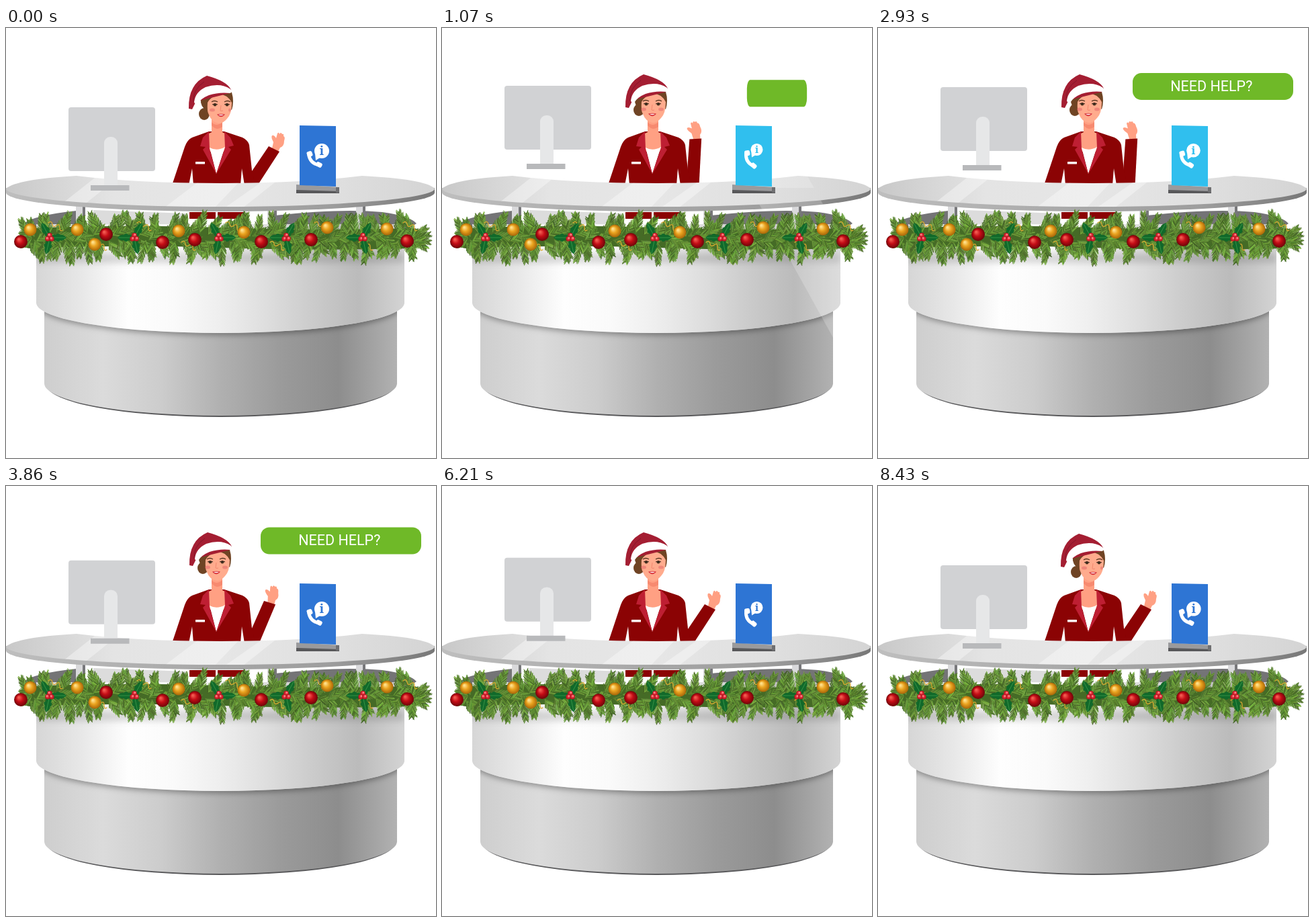
Animation, 640 px wide and 640 px high, one loop 8500 ms. Source, as an HTML page with a canvas:

```html
<!DOCTYPE html>
<html>
<head>
<meta charset="utf-8">
<style>
html, body { margin: 0; width: 100%; height: 100%; overflow: hidden; background: #fff; }
canvas { display: block; }
</style>
</head>
<body>
<canvas id="stage" width="640" height="640"></canvas>
<script>
const LOOP = 8500;
const stage = document.getElementById('stage').getContext('2d');
let c = stage;

const clamp = v => Math.max(0, Math.min(1, v));
const ramp = (t, a, b) => clamp((t - a) / (b - a));
const smooth = (t, a, b) => { const u = ramp(t, a, b); return u * u * (3 - 2 * u); };
const outCubic = u => 1 - (1 - u) ** 3;

function fill(path, color) {
  c.fillStyle = color;
  c.fill(path instanceof Path2D ? path : new Path2D(path));
}
function line(path, color, width) {
  c.strokeStyle = color;
  c.lineWidth = width;
  c.stroke(new Path2D(path));
}
function oval(x, y, rx, ry, color) {
  c.fillStyle = color;
  c.beginPath();
  c.ellipse(x, y, rx, ry, 0, 0, 7);
  c.fill();
}
function box(x, y, w, h, r, color) {
  c.fillStyle = color;
  c.beginPath();
  c.roundRect(x, y, w, h, r);
  c.fill();
}
function at(x, y, angle, draw, sx = 1, sy = sx) {
  c.save();
  c.translate(x, y);
  c.rotate(angle * Math.PI / 180);
  c.scale(sx, sy);
  draw();
  c.restore();
}
// Horizontal gradient of evenly spaced greys
function greys(x0, x1, ...values) {
  const g = c.createLinearGradient(x0, 0, x1, 0);
  values.forEach((v, i) => g.addColorStop(i / (values.length - 1), `rgb(${v},${v},${v})`));
  return g;
}

// Desk
const lower = new Path2D('M57 415V529A262.5 48 0 0 0 582 529V415Z');
const upper = new Path2D('M45 292V409A274 45 0 0 0 593 409V292Z');
const rim = new Path2D('M0 238V245A319 28 0 0 0 638 245V238Z');
const slab = new Path2D('M0 239Q16 225 105 220Q195 231 320 231Q440 231 530 220Q625 225 638 239A319 27 0 0 1 0 239Z');

function drawDesk() {
  fill('M60 531A259.5 48 0 0 0 579 531Z', '#58585a');
  fill(lower, greys(57, 582, 206, 219, 204, 176, 155, 141, 178));
  c.save();
  c.clip(lower);
  c.shadowColor = 'rgba(0,0,0,.35)';
  c.shadowBlur = 9;
  c.shadowOffsetY = 3;
  fill(upper, '#ccc');
  c.restore();
  fill('M27 291Q40 279 105 272V300H45ZM400 279Q500 268 560 274Q602 280 611 291L593 302H400Z', '#747476');
  fill('M130 271L270 276V300H130Z', '#dcdcdc');
  fill('M273 274H312V284H273ZM315 274H355V284H315Z', '#8b0304');
  for (const x of [104, 389, 521]) {
    box(x, 264, 13, 28, 0, '#d9d9db');
    box(x + 10, 264, 4, 28, 0, '#77777a');
  }
  fill(upper, greys(45, 593, 214, 232, 254, 250, 238, 222, 203, 187, 212));
  c.save();
  c.clip(upper);
  c.filter = 'blur(4px)';
  box(45, 335, 548, 15, 0, 'rgba(60,60,60,.18)');
  c.restore();
}

function drawCounter() {
  fill(rim, greys(0, 638, 190, 178, 166, 158, 120));
  fill(slab, greys(0, 638, 200, 228, 230, 224, 212));
  c.save();
  c.clip(slab);
  fill('M136 220H170L110 268H75ZM290 226H350L310 268H235ZM385 226H405L352 268H325Z', 'rgba(255,255,255,.35)');
  c.restore();
}

// A slanted band of light passing over the desk
const deskParts = new Path2D();
[lower, upper, rim, slab].forEach(p => deskParts.addPath(p));
function drawShine(t) {
  if (t > 1450) return;
  const x = 520 + .65 * (t - 1070);
  c.save();
  c.clip(deskParts);
  fill(`M${x - 72} 220h95l205 370h-95Z`, 'rgba(255,255,255,.2)');
  c.restore();
}

// Garland, painted once
const garland = document.createElement('canvas');
garland.width = garland.height = 640;

function bauble(x, y, r, light, mid, dark) {
  const g = c.createRadialGradient(x - r * .3, y - r * .35, r * .1, x, y, r);
  g.addColorStop(0, light);
  g.addColorStop(.45, mid);
  g.addColorStop(1, dark);
  oval(x, y, r, r, g);
}

function holly(x, flip) {
  at(x, 312, 0, () => {
    for (const angle of [242, 0, 102]) at(0, 0, angle, () => {
      fill('M2 0Q5 -6 9 -4Q12 -8 16 -4Q20 -5 25 0Q20 5 16 4Q12 8 9 4Q5 6 2 0Z', '#11692a');
      line('M3 0H23', '#3c9a4a', .8);
    });
    for (let i = 0; i < 3; i++) {
      const a = i * 2.1 - 1.57;
      bauble(3.4 * Math.cos(a), 3.4 * Math.sin(a), 3.8, '#ff9c9c', '#e3303a', '#a80f1c');
    }
  }, flip ? -1 : 1, 1);
}

function paintGarland() {
  let seed = 11;
  const rnd = () => (seed = seed * 16807 % 2147483647) / 2147483647;
  const sprig = (x, y, angle, len) => at(x, y, angle, () => {
    line(`M0 0H${len}`, '#4f6f2a', 2);
    for (let i = 0; i < 44; i++) {
      const d = i / 44 * len, n = 12 - i / 7, s = i % 2 ? 1 : -1;
      const tone = `hsl(${84 + rnd() * 12} ${38 + rnd() * 14}% ${24 + rnd() * 26}%)`;
      line(`M${d} 0L${d + n * .85} ${s * n * (.4 + rnd() * .25)}`, tone, 1);
    }
  });
  c.lineCap = 'round';
  line('M36 313Q180 307 320 312T606 313', '#456b26', 30);
  for (let x = 30; x < 612; x += 11) {
    for (const s of [-1, 1]) {
      const lean = 10 + (rnd() - .5) * 70;
      sprig(x + rnd() * 6, 312 + s * (2 + rnd() * 6), s * (90 - lean), 24 + rnd() * 8);
    }
  }
  for (let a = -36; a <= 36; a += 24) {
    sprig(38, 313, 180 + a, 16);
    sprig(604, 313, a, 26);
  }
  for (let x = 45; x < 600; x += 14) sprig(x, 306 + rnd() * 12, (rnd() - .5) * 80, 20);

  for (let i = 0; i < 9; i++) {
    line(`M${63 + 66 * i} ${i % 2 ? 319 : 290}q5 -4 6 2t6 2t5 3t4 4`, '#dba92f', 1.3);
  }
  [65, 191, 317, 417, 531].forEach((x, i) => holly(x, i % 2 || i > 3));
  [[22, 318], [149, 307], [233, 319], [281, 315], [380, 318], [454, 315], [597, 317]]
    .forEach(([x, y]) => bauble(x, y, 10, '#f25a50', '#c40d16', '#6d0409'));
  [[36, 300], [106, 300], [132, 322], [257, 302], [354, 304], [478, 297], [567, 299]]
    .forEach(([x, y]) => bauble(x, y, 9.5, '#ffe08a', '#eaa31f', '#a96608'));
}
c = garland.getContext('2d');
paintGarland();
c = stage;

// Receptionist
const skin = '#ffa083';
const jacket = '#8b0304';

function armAngle(t) {
  if (t < 500 || t > 6200) return 0;
  const u = (t - 500) % 1900 / 1900;
  return -30 * (smooth(u, 0, .28) - smooth(u, .44, .98));
}

function drawArm(t) {
  at(360, 213, armAngle(t), () => {
    c.translate(-360, -213);
    fill('M396 179L398 170Q394 162 396 160Q399 159 402 164L404 157Q406 154 407 158Q409 154 411 158Q414 157 413 161Q416 162 414 168Q414 176 408 178L405 184Z', skin);
    fill('M391 176L407 184L370 241L352 236L366 213Z', jacket);
  });
}

function drawBody() {
  fill('M302 154L277 163Q270 166 266 177L247 234H272L277 209L279 234H349L351 209L355 234H371L366 212L362 174Q360 167 352 163L325 154Z', jacket);
  fill('M306 132H322V155L326 157V182L314 192L302 182V157L306 155Z', skin);
  fill('M306 140Q313 148 322 140V147Q314 154 306 145Z', '#f78a70');
  fill('M303 178Q314 184 326 177L313 217Z', '#fff');
  fill('M302 154L293 163L289 176L297 177L293 181L313 217L303 180ZM325 154L334 163L339 175L331 177L335 181L313 217L326 178Z', '#be1f33');
  box(282, 199, 14, 3.5, .5, '#fff');
}

// turn: 1 looks towards the visitor, 0 looks to the front
function drawHead(turn) {
  const hair = '#6f4424';
  oval(293 + 2 * turn, 122 + 6 * turn, 8, 9, hair);
  at(3 * turn, turn, 0, () => {
    fill('M287 110Q286 96 302 91Q322 87 333 95Q337 108 333 121L324 112H302L299 122Q289 120 287 110Z', hair);
    fill('M297 110Q300 97 314 96Q331 96 333 110Q333 127 326 134Q319 142 313 141Q303 139 299 128Q296 124 297 110Z', '#ffab8d');
    fill('M294 117Q297 104 313 97Q327 98 333 110Q336 98 328 93L300 93L288 106Z', hair);
  });
  at(7 * turn, turn, 0, () => {
    oval(300, 121, 4, 2.5, 'rgba(220,90,100,.45)');
    oval(326, 121, 4 - 2 * turn, 2.5, 'rgba(220,90,100,.45)');
    line('M299 109Q303 106 308 109M318 109Q323 106 327 109', '#54331f', 1.3);
    oval(304, 113.5, 2.4, 2, '#42301f');
    oval(322, 113.5, 2.4, 2, '#42301f');
    line('M300 113Q304 110 308 113M318 113Q322 110 326 113', '#2c1c14', 1);
    line('M313 114L312 122Q314 123 316 122', '#f28a70', 1);
    fill('M307 127.5Q313 126 319 127.5Q313 135 307 127.5Z', '#d8343c');
    fill('M309 128Q313 127.5 317 128Q313 130.5 309 128Z', '#fff');
  });
  at(300 - turn, 95 + 2 * turn, 0, () => {
    fill('M-27 23Q-28 -14 0 -26Q30 -18 36 -5L34 0L-14 12L-18 16L-22 24Z', '#a41e32');
    line('M-20 13Q-21 -6 -4 -17', '#85152a', 1);
    fill('M-19 13Q-17 -2 -2 -9Q20 -16 35 -6Q38 -3 35 0Q18 -2 3 3Q-9 8 -13 15Q-18 18 -19 13Z', '#fff');
  });
}

// Three shrinking jumps in each two-second bounce
function hop(t) {
  let lift = 0;
  for (const start of [240, 2284, 5040]) {
    const u = (t - start) / 2000;
    for (const [a, b, height] of [[.2, .53, 32], [.53, .8, 16], [.8, 1, 4]]) {
      const top = a + (b - a) * .62;
      lift += height * (outCubic(ramp(u, a, top)) - ramp(u, top, b) ** 5);
    }
  }
  return lift;
}

function drawMonitor(t) {
  at(0, -hop(t), 0, () => {
    box(93, 118, 129, 95, 4, '#d1d2d4');
    box(146, 162, 20, 74, [9, 9, 0, 0], '#e6e7e8');
    box(126, 234, 57.5, 8, 0, '#b8b9bb');
  });
}

// Ten rings per loop, a little quicker at the beginning
function ringPose(t) {
  const phase = 10 * t / LOOP + .46 * Math.sin(Math.PI * t / LOOP);
  return smooth(Math.abs(phase - Math.round(phase)), 0, .36);
}

function drawSign(t) {
  const beat = (t - 500) / 1900;
  const lit = beat > 0 && beat < 3 && beat % 1 > .26 && beat % 1 < .6;
  const color = lit ? '#30bfee' : '#2e75d4';
  fill('M432 239L496 241V246H432Z', '#58585a');
  fill('M432 233L496 237V243L432 241Z', '#9a9a9c');
  box(491, 237, 5, 8, 0, '#6f6f71');
  fill('M437 145L491 146V236L437 234Z', color);

  const p = ringPose(t);
  at(458.5, 196, 14 * p, () => {
    c.lineCap = 'butt';
    line('M-8 -8Q-6 6 8 8', '#fff', 5);
    at(-6.5, -8.5, -22, () => box(-4, -4, 8, 8, 2.5, '#fff'));
    at(7.5, 7.5, 28, () => box(-4.5, -3.5, 9, 7, 2.5, '#fff'));
  });
  at(470 - 1.5 * p, 183 - 2 * p, 0, () => {
    oval(0, 0, 11, 11, '#fff');
    fill('M-10 4L-9 14L-1 9Z', '#fff');
    c.fillStyle = color;
    c.font = 'bold 18px "Noto Serif", serif';
    c.textAlign = 'center';
    c.fillText('i', 0, 6.5);
  }, 1 - .18 * p);
}

function drawBubble(t) {
  const w = outCubic(ramp(t, 1002, 1480)) * (1 - ramp(t, 5600, 6160) ** 2);
  if (w <= 0) return;
  const lift = 8 * (1 - Math.cos(ramp(t, 1860, 5530) * 2 * Math.PI));
  at(498.5, 97.2 - lift, 0, () => box(-119.5, -20, 239, 40, 13, '#6fb928'), w, 1);
  c.globalAlpha = smooth(t, 1450, 1750) * (1 - smooth(t, 5350, 5600));
  c.fillStyle = '#fff';
  c.font = '400 21.5px Roboto, sans-serif';
  c.textAlign = 'center';
  c.fillText('NEED HELP?', 496.3, 104 - lift);
  c.globalAlpha = 1;
}

function draw(now) {
  const t = now % LOOP;
  c.fillStyle = '#fff';
  c.fillRect(0, 0, 640, 640);
  drawDesk();
  drawArm(t);
  drawBody();
  drawHead(1 - smooth(t, 300, 700) + smooth(t, 7150, 7650));
  drawCounter();
  drawShine(t);
  c.drawImage(garland, 0, 0);
  drawMonitor(t);
  drawSign(t);
  drawBubble(t);
}

const start = performance.now();
(function tick() {
  draw(performance.now() - start);
  requestAnimationFrame(tick);
})();
</script>
</body>
</html>
```
